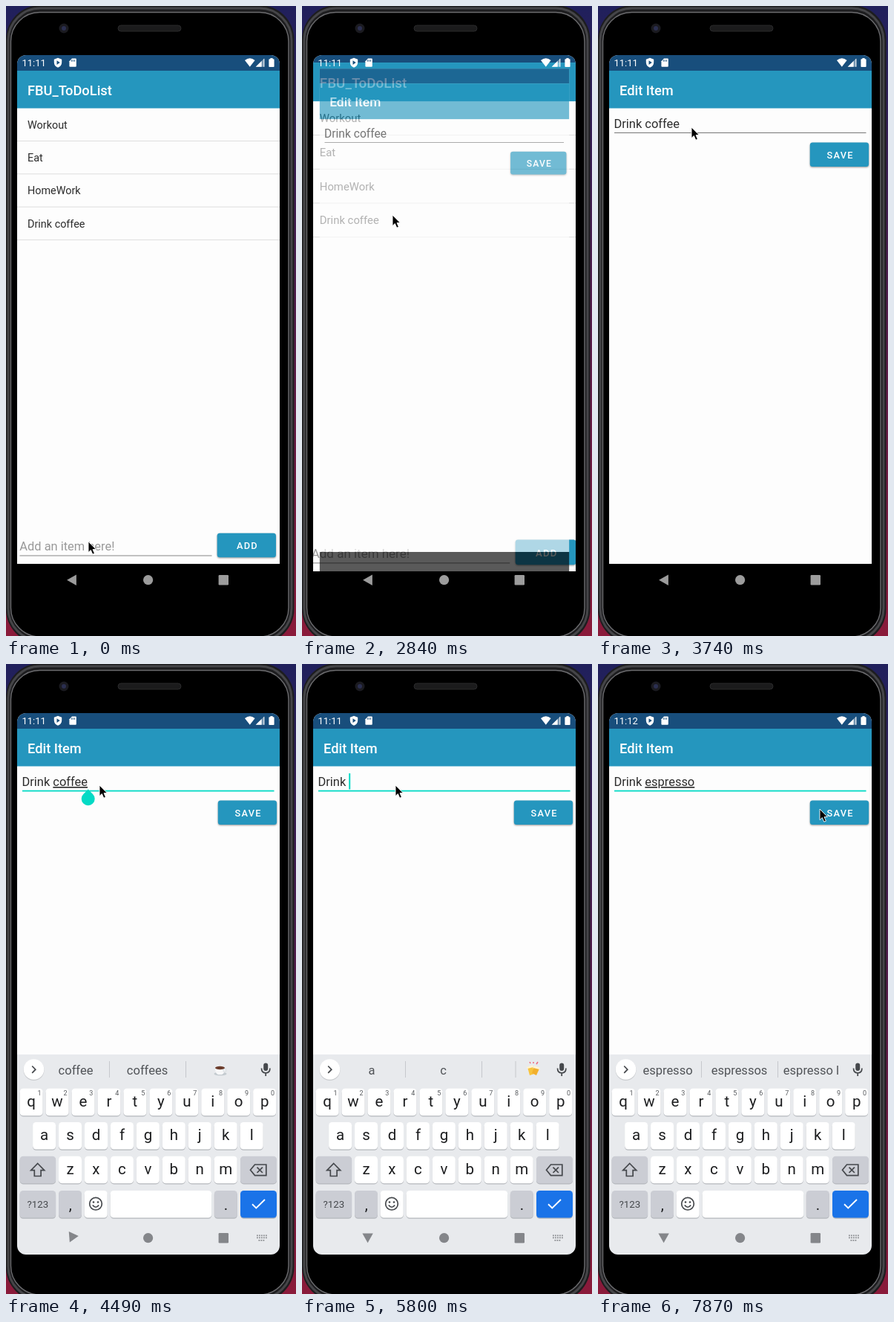
Write an HTML page that moves like this. It is 391 px wide and 847 px high and loops after 8000 ms.

```html
<!DOCTYPE html>
<html>
<head>
<meta charset="utf-8">
<style>
html, body { margin: 0; width: 100%; height: 100%; overflow: hidden; background: #000; }
svg { display: block; width: 391px; height: 847px; font-family: Roboto, sans-serif; }
text { white-space: pre; }
.title { font-size: 18.3px; font-weight: 500; fill: #fff; }
.item { font-size: 14.4px; fill: #2c2c2c; }
.field { font-size: 16.45px; fill: #2c2c2c; }
.button { font-size: 12.8px; font-weight: 500; letter-spacing: 1.2px; fill: #fff; text-anchor: middle; }
.raised { filter: drop-shadow(0 1px 1px #0006); }
.key { font-size: 20.5px; fill: #1c1d1f; text-anchor: middle; }
.hint { font-size: 9px; fill: #55585c; text-anchor: middle; }
.word { font-size: 16.5px; fill: #505357; text-anchor: middle; }
.line { fill: none; stroke: #45484c; stroke-width: 1.7; }
</style>
</head>
<body>
<svg viewBox="0 0 391 847">
  <defs>
    <linearGradient id="wall" x2="0" y2="1">
      <stop offset="0" stop-color="#20205c"/><stop offset="1" stop-color="#8a1a3a"/>
    </linearGradient>
    <clipPath id="screen"><rect x="15" y="66" width="354" height="728" rx="12"/></clipPath>
    <clipPath id="strip"><rect x="15" y="525" width="310" height="42"/></clipPath>
  </defs>

  <rect width="391" height="847" fill="url(#wall)"/>
  <rect x="0" y="-1" width="388.5" height="858" rx="46" fill="#1d1d1f"/>
  <rect x="3" y="3" width="382" height="850" rx="43" fill="none" stroke="#454548" stroke-width="3"/>
  <rect x="6.5" y="8.5" width="374.5" height="839.5" rx="39" fill="#000" stroke="#6c6c6f" stroke-width="1.4"/>
  <circle cx="78" cy="30" r="6.5" fill="#1b1b20"/>
  <circle cx="78" cy="30" r="3" fill="#2b2f50"/>
  <rect x="151" y="26" width="85" height="8" rx="4" fill="#1b1b1c" stroke="#2a2a2b"/>

  <g clip-path="url(#screen)">
    <g id="list"></g>
    <g id="edit"></g>
    <g id="keyboard"></g>

    <g fill="#fff">
      <text id="clock" x="21.4" y="81" font-size="13"></text>
      <path d="M70 69.8l5.2 2v4.2c0 3.2-2.2 5.8-5.2 6.8-3-1-5.2-3.6-5.2-6.8v-4.2z"/>
      <path d="M68.5 73.3l4.2 2.8-4.2 2.8z" fill="#184e7c"/>
      <path d="M89 70.6h4.8q1 0 1 1v9.2q0 1-1 1h-7.4q-1 0-1-1v-6.6z"/>
      <path d="M88.3 72.4v2.3M90.4 72.4v2.3M92.5 72.4v2.3" stroke="#184e7c"/>
      <path d="M322 73q6.8-5.4 13.6 0l-6.8 8.8z"/>
      <path d="M348.3 70.2v11.6h-11.6z" opacity=".4"/>
      <path d="M344.6 73.9v7.9h-7.9zM347.3 71.2h1v10.6h-1z"/>
      <path d="M356.4 71.3v-1.3h3.2v1.3h1.1q.9 0 .9.9v9q0 .8-.9.8h-5.4q-.9 0-.9-.8v-9q0-.9.9-.9z"/>
    </g>

    <g id="nav">
      <path id="back" d="M-6.5 0L6.3-7.2V7.2z"/>
      <circle cx="191.6" cy="771.7" r="6.6"/>
      <rect x="286.6" y="765" width="13.4" height="13.4" rx="1.2"/>
      <path id="switcher" d="M338 768.3h14M338 771.3h14M340.5 774.8h9" stroke="#8b8d91" stroke-width="1.8" stroke-dasharray="1.8 1.2"/>
    </g>
  </g>
  <path id="pointer" d="M0 0V14.6l3.3-3.1 2.5 5.7 2.6-1.1-2.4-5.5h4.4z" stroke="#fff" stroke-width=".9"/>
</svg>

<script>
const $ = id => document.getElementById(id);
const rect = (x, y, w, h, fill, r = 0, more = '') =>
  `<rect x="${x}" y="${y}" width="${w}" height="${h}" rx="${r}" fill="${fill}" ${more}/>`;
const text = (x, y, cls, s, more = '') => `<text x="${x}" y="${y}" class="${cls}" ${more}>${s}</text>`;

const activity = title =>
  rect(15, 66, 354, 684, '#fdfdfd') + rect(15, 750, 354, 44, '#000') +
  rect(15, 66, 354, 21, '#184e7c') + rect(15, 87, 354, 50.5, '#2596be') +
  text(29, 119.5, 'title', title);
const button = (x, y, label) =>
  rect(x, y, 79.3, 32.5, '#2596be', 3.5, 'class="raised"') +
  text(x + 40.8, y + 21.4, 'button', label);

$('list').innerHTML = activity('FBU_ToDoList') +
  ['Workout', 'Eat', 'HomeWork', 'Drink coffee'].map((s, i) =>
    text(29, 164.8 + i * 44.3, 'item', s) + rect(15, 181 + i * 44.3, 354, 1, '#dedede')).join('') +
  text(18.3, 732, 'field', 'Add an item here!', 'style="fill:#999"') +
  rect(18.5, 738.5, 259, 1, '#858585') + button(284.7, 708.7, 'ADD');

$('edit').innerHTML = activity('Edit Item') +
  `<text x="21.5" y="164" class="field" id="entry">Drink <tspan id="typed"></tspan></text>` +
  `<rect id="underline" x="22" width="339.5"/>` +
  `<rect id="caret" y="147" width="2" height="21.5" fill="#03dac5"/>` +
  `<path id="handle" d="M110.7 168.5l6.4 6.4a9 9 0 1 1-12.8 0z" fill="#03dac5"/>` +
  button(285.8, 183.4, 'SAVE');

const key = (x, y, w, fill = '#fff') => rect(x, y + 1.2, w, 36.5, '#b4b7bc', 4.5) + rect(x, y, w, 36.5, fill, 4.5);
const GRAY = '#cbcdd4';
const letters = (row, x0, y) => [...row].map((c, i) => {
  const x = x0 + i * 34.95;
  return key(x, y, 31) + text(x + 15.5, y + 24, 'key', c);
}).join('');

$('keyboard').innerHTML = rect(15, 525, 354, 269, '#e8eaed') +
  '<circle cx="37.5" cy="546" r="14" fill="#c9cbce"/><circle cx="37.5" cy="545" r="13.8" fill="#fff"/>' +
  '<path class="line" d="M35.2 540.5l4.6 4.7-4.6 4.7"/>' +
  rect(139, 534, 1, 22, '#c6c8cc') + rect(242, 534, 1, 22, '#c6c8cc') +
  '<g clip-path="url(#strip)">' + [94, 190.5, 287.5].map((x, i) => text(x, 551.7, 'word', '', `id="word${i}"`)).join('') + '</g>' +
  '<g id="coffee"><ellipse cx="289" cy="551" rx="8.5" ry="2.3" fill="#c4cbd0"/>' +
  '<path d="M282 543h13q0 8-4 9h-5q-4-1-4-9z" fill="#f7f8f9"/><circle cx="295" cy="546" r="2.2" fill="none" stroke="#dfe3e6" stroke-width="1.4"/>' +
  '<ellipse cx="288.5" cy="543" rx="6.5" ry="2.2" fill="#6b3c2b"/></g>' +
  '<g id="beer">' + rect(287.5, 534, 1, 22, '#c6c8cc') +
  '<path d="M304 542l7-2 2 11-6 2z" fill="#f8c33c"/><path d="M313 541l7 3-4 9-6-3z" fill="#f2b02d"/>' +
  '<path d="M303 542l8-3 1 3-8 2zM313 540l8 3-1 2-8-2z" fill="#fff3d2"/>' +
  '<path d="M308 537l-1-2M312 537v-2M316 538l2-3" stroke="#ee6a7c" stroke-width="1.5"/></g>' +
  rect(347.2, 536.5, 6, 10.5, '#45484c', 3) +
  '<path class="line" d="M344.5 543.5q0 6.3 5.7 6.3t5.7-6.3M350.2 550v4"/>' +
  letters('qwertyuiop', 18.6, 570.7) +
  [...'1234567890'].map((c, i) => text(45 + i * 34.95, 580.3, 'hint', c)).join('') +
  letters('asdfghjkl', 36.1, 616) + letters('zxcvbnm', 71, 661.7) +
  key(18.6, 661.7, 48.5, GRAY) + key(316, 661.7, 49, GRAY) +
  key(18.6, 708, 48.5, GRAY) + key(71, 708, 31, GRAY) + key(105.7, 708, 31) +
  key(140.7, 708, 136.5) + key(280.8, 708, 31, GRAY) + key(316, 708, 49, '#1a73e8') +
  text(42.8, 731, 'key', '?123', 'style="font-size:13.3px;fill:#45484c"') +
  text(86.8, 734, 'key', ',') + text(296.5, 734, 'key', '.') +
  '<path class="line" d="M42.7 671.5l9 9.2h-4.6v7.8h-8.8v-7.8h-4.6z"/>' +
  '<path class="line" d="M335.5 673h15.3v14.6h-15.3l-6-7.3zM338.5 676.6l7.4 7.4M345.9 676.6l-7.4 7.4"/>' +
  '<circle class="line" cx="121" cy="725.7" r="8.3"/><path class="line" d="M116.8 727.5q4.2 5.5 8.4 0"/>' +
  '<circle cx="118" cy="723.5" r="1.3" fill="#45484c"/><circle cx="124" cy="723.5" r="1.3" fill="#45484c"/>' +
  '<path d="M332 726.3l5.3 5.2L349 720" fill="none" stroke="#fff" stroke-width="1.9"/>';

// Each entry: start time, then its values, held until the next entry
const pointerSteps = [
  [0, 111, 720], [1500, 114, 690], [1650, 130, 540], [1800, 131, 375], [1950, 125, 258], [2090, 122, 281],
  [3290, 122, 268], [3440, 124, 215], [3590, 126, 174], [3740, 126, 163],
  [7580, 235, 172], [7720, 381, 206], [7870, 299, 195]];
const typing = [
  [0, 'coffee', 'coffee', 'coffees', ''], [4940, 'coffe', 'coffe', 'coffee', 'coffees'],
  [5090, 'coff', 'coff', 'coffee', 'coffees'], [5240, 'cof', 'cof', 'coffee', 'of'],
  [5370, 'co', 'co', 'coffee', 'come'], [5510, 'c', 'c', 'coffee', 'can'],
  [5660, '', 'a', 'c', ''], [5950, 'e', 'e', 'every', 'enough'],
  [6250, 'es', 'es', 'essay', 'especially'], [6540, 'esp', 'esp', 'espresso', 'especially'],
  [6690, 'espr', 'espr', 'espresso', 'espressos'], [6840, 'espre', 'espre', 'espresso', 'espressos'],
  [6980, 'espres', 'espres', 'espresso', 'espressos'], [7130, 'espress', 'espress', 'espresso', 'espressos'],
  [7430, 'espresso', 'espresso', 'espressos', 'espresso l']];
const backTurn = [[0, 0], [4040, -10], [4340, -35], [4490, -65], [4640, -83], [4790, -90]];
const slide = [[0, 0], [4340, 60], [4490, 0]];

const at = (steps, t) => steps.findLast(s => s[0] <= t).slice(1);
const show = (id, on) => $(id).style.display = on ? '' : 'none';
const zoom = s => `translate(192 430) scale(${s}) translate(-192 -430)`;

function draw(t) {
  const opening = t >= 2840 && t < 2990;
  const focused = t >= 3890, keyboard = t >= 4340;
  const [word, ...suggestions] = at(typing, t);

  show('list', t < 2990);
  show('edit', t >= 2840);
  $('list').setAttribute('transform', zoom(opening ? 1.032 : 1));
  $('edit').setAttribute('transform', zoom(opening ? .95 : 1));
  $('edit').setAttribute('opacity', opening ? .64 : 1);

  $('clock').textContent = t < 6840 ? '11:11' : '11:12';
  $('typed').textContent = word;
  $('typed').setAttribute('text-decoration', keyboard ? 'underline' : 'none');
  const line = $('underline');
  line.setAttribute('y', focused ? 169.7 : 170);
  line.setAttribute('height', focused ? 1.8 : 1);
  line.setAttribute('fill', focused ? '#03dac5' : '#777');

  show('handle', t >= 4040 && t < 4940);
  show('caret', t >= 3890 && t < 4490 || t >= 4940 && t < 7580);
  $('caret').setAttribute('x', word ? 21.5 + $('entry').getComputedTextLength() : 63.2);

  show('keyboard', keyboard);
  $('keyboard').setAttribute('transform', `translate(0 ${at(slide, t)})`);
  suggestions.forEach((s, i) => $('word' + i).textContent = s);
  show('coffee', word === 'coffee');
  show('beer', word === '');

  show('switcher', keyboard);
  $('nav').setAttribute('fill', keyboard ? '#84868a' : '#9c9c9c');
  $('back').setAttribute('transform', `translate(88.6 771.7) rotate(${at(backTurn, t)})`);
  $('pointer').setAttribute('transform', `translate(${at(pointerSteps, t)})`);
}

function tick() {
  draw(performance.now() % 8000);
  requestAnimationFrame(tick);
}
tick();
</script>
</body>
</html>
```
